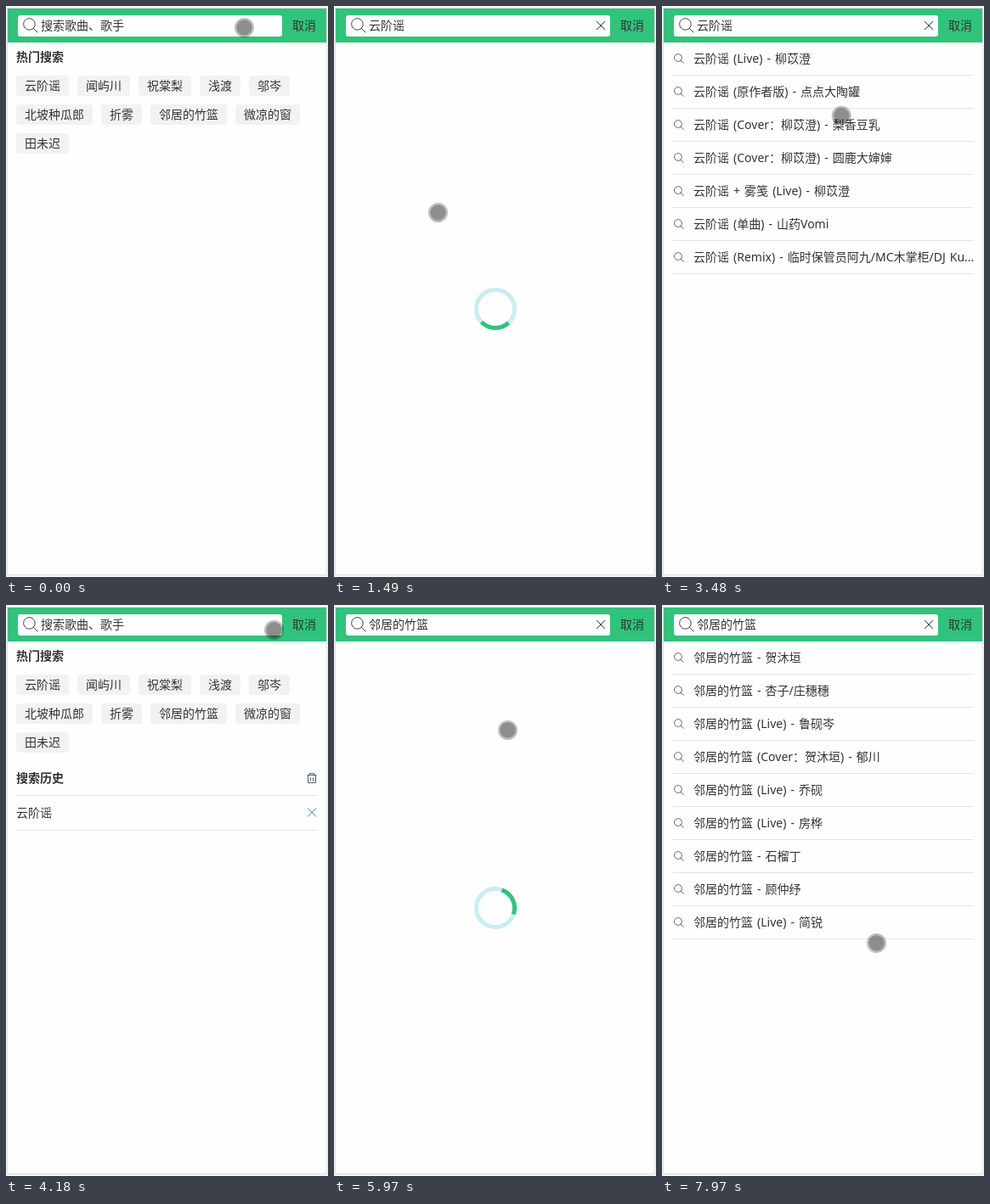
An HTML page for the animation above (8 s loop, 379 by 673 pixels).

```html
<!DOCTYPE html>
<html lang="zh-CN">
<head>
<meta charset="utf-8">
<title>搜索</title>
<style>
html, body { margin: 0; width: 100%; height: 100%; overflow: hidden; background: #f7f7f7; }
svg { display: block; width: 100%; height: 100%; }
text {
  font: 14px "Noto Sans", "Noto Sans CJK SC", "Noto Sans CJK", sans-serif;
  word-spacing: 1.4px;
  fill: #333;
}
.bold { font-weight: 700; }
.rule { stroke: #e4e4e4; }
.icon { fill: none; }
</style>
</head>
<body>
<svg id="stage" viewBox="0 0 379 673"></svg>
<script>
const LOOP = 8000;
const TICK = 135.6;   // ms between screen updates
const GLIDE = 500;    // longest pointer move, ms
const GREEN = '#31c27c';
const SONGS = ['云阶谣', '邻居的竹篮'];

const TAGS = [
  [SONGS[0], '闻屿川', '祝棠梨', '浅渡', '邬岑'],
  ['北坡种瓜郎', '折雾', SONGS[1], '微凉的窗'],
  ['田未迟']
];

const RESULTS = [
  [' (Live) - 柳苡澄', ' (原作者版) - 点点大陶罐', ' (Cover:柳苡澄) - 梨香豆乳',
   ' (Cover:柳苡澄) - 圆鹿大婶婶', ' + 雾笺 (Live) - 柳苡澄', ' (单曲) - 山药Vomi',
   ' (Remix) - 临时保管员阿九/MC木掌柜/DJ Ku...'],
  [' - 贺沐垣', ' - 杏子/庄穗穗', ' (Live) - 鲁砚岑', ' (Cover:贺沐垣) - 郁川',
   ' (Live) - 乔砚', ' (Live) - 房桦', ' - 石榴丁', ' - 顾仲纾', ' (Live) - 简锐']
].map((rows, i) => rows.map(r => SONGS[i] + r.replace(':', '\uff1a')));

// Pointer stops: the pointer rests, then glides so as to arrive on time
const STOPS = [
  { at: 0, x: 280.5, y: 25.5 },
  { at: 560, x: 45, y: 95 },
  { at: 1085, x: 122.5, y: 243.5 },
  { at: 2570, x: 301.5, y: 105.5 },
  { at: 3180, x: 201.5, y: 138.5 },
  { at: 3800, x: 315.5, y: 29.5 },
  { at: 5190, x: 246.5, y: 96.5 },
  { at: 5690, x: 199.5, y: 133.5 },
  { at: 5960, x: 204.5, y: 147.5 },
  { at: 6360, x: 213.5, y: 231.5 },
  { at: 7040, x: 310, y: 35.5 },
  { at: 7420, x: 319.5, y: 25.5 },
  { at: 7860, x: 252.5, y: 398.5 }
];

const SCREENS = [
  { at: 0, view: 'home' },
  { at: 975, view: 'load', song: SONGS[0] },
  { at: 1610, view: 'list0', song: SONGS[0] },
  { at: 4180, view: 'past' },
  { at: 5970, view: 'load', song: SONGS[1] },
  { at: 6360, view: 'list1', song: SONGS[1] }
];

const label = (x, y, s, cls = '') => `<text x="${x}" y="${y}" class="${cls}">${s}</text>`;
const rule = y => `<path class="rule" d="M12 ${y}H367"/>`;
const cross = (x, y, color) =>
  `<path class="icon" stroke="${color}" d="M${x - 5} ${y - 5}l10 10m0-10l-10 10"/>`;
const lens = (x, y, r, tail, color) => {
  const e = r * Math.SQRT1_2;
  return `<g class="icon" stroke="${color}"><circle cx="${x}" cy="${y}" r="${r}"/>` +
    `<path d="M${x + e} ${y + e}l${tail} ${tail}"/></g>`;
};

function tagRow(names, row) {
  let x = 12;
  const y = 82 + row * 34;
  return names.map(name => {
    const w = name.length * 14 + 20;
    const tag = `<rect x="${x}" y="${y}" width="${w}" height="24" rx="4" fill="#f2f2f2"/>` +
      label(x + 10, y + 17, name);
    x += w + 10;
    return tag;
  }).join('');
}

const resultRow = (s, i) => {
  const y = 39 * i;
  return lens(18.9, y + 61, 4.4, 3.6, '#75665f') + label(37, y + 67, s) + rule(y + 81.5);
};

const trash = `<path class="icon" stroke="#4a5a6c"
  d="M354.5 200.5h11M357.5 200v-1.5h5v1.5M355.5 201v8.5h9v-8.5M358.5 203.5v4m3-4v4"/>`;

const home = label(12, 65, '热门搜索', 'bold') + TAGS.map(tagRow).join('');
const past = label(12, 209, '搜索历史', 'bold') + trash + rule(224.5) +
  label(12, 250, SONGS[0]) + cross(360, 244.5, '#3f78a8') + rule(265.5);
const ring = (color, extra = '') =>
  `<circle cx="190" cy="357" r="22.5" fill="none" stroke="${color}" stroke-width="5" ${extra}/>`;

document.getElementById('stage').innerHTML = `
  <rect x="1.5" y="2.5" width="376" height="668" fill="#fefefe" stroke="#dedede"/>
  <rect x="2" y="3" width="375" height="40" fill="${GREEN}"/>
  <rect x="14" y="11" width="311" height="25" rx="3" fill="#fefefe"/>
  ${lens(27.4, 21.4, 6.8, 5.2, '#444')}
  <text id="query" x="41" y="28"></text>
  <g id="clear">${cross(314, 23, '#26384f')}</g>
  ${label(337, 28, '取消')}
  <g id="home">${home}</g>
  <g id="past">${past}</g>
  <g id="load">${ring('#c9edf1')}${ring(GREEN, 'id="arc" pathLength="100" stroke-dasharray="25 75"')}</g>
  <g id="list0">${RESULTS[0].map(resultRow).join('')}</g>
  <g id="list1">${RESULTS[1].map(resultRow).join('')}</g>
  <g id="pointer">
    <circle r="10.3" fill="none" stroke="#000" stroke-opacity=".25" stroke-width="2.4"/>
    <circle r="9.2" fill-opacity=".44"/>
  </g>`;

const el = id => document.getElementById(id);
const show = (id, on) => el(id).setAttribute('display', on ? 'inline' : 'none');

function pointerAt(t) {
  const i = STOPS.findLastIndex(s => s.at <= t);
  const a = STOPS[i], b = STOPS[i + 1] || a;
  const span = Math.min(GLIDE, b.at - a.at) || 1;
  const u = Math.max(0, 1 - (b.at - t) / span);
  const k = b === a ? 0 : u * u * (3 - 2 * u);
  return [a.x + (b.x - a.x) * k, a.y + (b.y - a.y) * k];
}

function draw(time) {
  const t = TICK * Math.floor(time / TICK + 0.1);
  const { view, song } = SCREENS.findLast(s => s.at <= time);
  el('query').textContent = song || '搜索歌曲、歌手';
  show('clear', song);
  show('home', view === 'home' || view === 'past');
  for (const id of ['past', 'load', 'list0', 'list1']) show(id, view === id);
  el('arc').setAttribute('transform', `rotate(${t * 0.376 - 514} 190 357)`);
  el('pointer').setAttribute('transform', `translate(${pointerAt(t)})`);
}

const origin = performance.now();
function tick() {
  draw((performance.now() - origin) % LOOP);
  requestAnimationFrame(tick);
}
tick();
</script>
</body>
</html>
```
